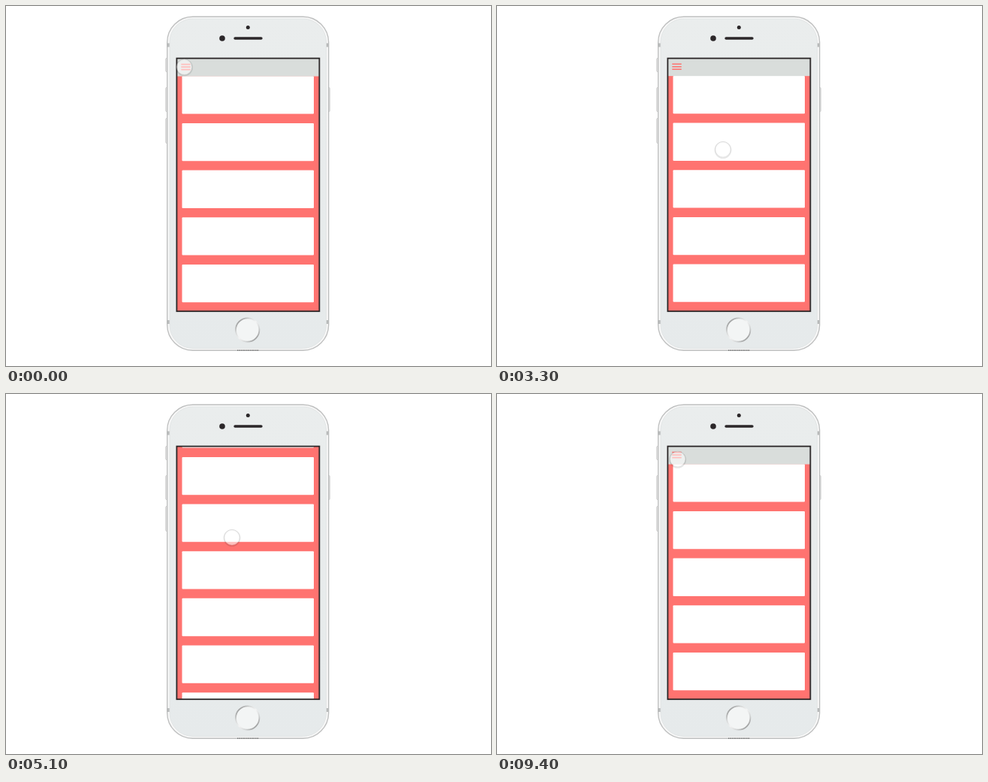
These frames come from a looping animation (646x479 px, 9.5 s). An HTML page:

```html
<!DOCTYPE html>
<html lang="en">
<head>
<meta charset="utf-8">
<title>Phone drawer and scroll</title>
<style>
html, body { margin: 0; width: 100%; height: 100%; overflow: hidden; background: #fff; }
svg { display: block; width: 646px; height: 479px; }
</style>
</head>
<body>
<svg viewBox="0 0 646 479">
  <defs>
    <linearGradient id="face" x1="0" y1="0" x2="0" y2="1">
      <stop offset="0" stop-color="#eaeded"/>
      <stop offset="1" stop-color="#e6eaeb"/>
    </linearGradient>
    <linearGradient id="cream" x1="0" y1="0" x2="0" y2="1">
      <stop offset=".25" stop-color="#f6f6e7"/>
      <stop offset=".4" stop-color="#f5f8e6"/>
    </linearGradient>
    <linearGradient id="ring" x1="0" y1="0" x2="1" y2="1">
      <stop offset="0" stop-color="#777"/>
      <stop offset=".3" stop-color="#d4d6d6"/>
      <stop offset=".5" stop-color="#f4f4f4"/>
      <stop offset=".7" stop-color="#d4d6d6"/>
      <stop offset="1" stop-color="#777"/>
    </linearGradient>
    <clipPath id="screen"><rect x="228" y="70" width="189" height="336"/></clipPath>
  </defs>

  <g fill="#e6e6e6" stroke="#bdbdbd" stroke-width=".7">
    <rect x="212.7" y="69.5" width="3" height="18" rx="1"/>
    <rect x="212.7" y="108.5" width="3" height="32" rx="1"/>
    <rect x="212.7" y="149.5" width="3" height="33" rx="1"/>
    <rect x="428.3" y="108.5" width="3" height="32" rx="1"/>
  </g>
  <rect x="214.7" y="14.2" width="215" height="444" rx="34" fill="#f7f7f7" stroke="#bfc0c0" stroke-width="1.4"/>
  <path d="M214 52h4M426 52h4M214 420.5h4M426 420.5h4" stroke="#b9bbbb" stroke-width="5"/>
  <rect x="218" y="17" width="208.5" height="438.5" rx="31" fill="url(#face)" stroke="#dfe2e2" stroke-width=".8"/>
  <path d="M308 458.2h29" stroke="#777" stroke-width="1.6" stroke-dasharray="1.4 1"/>

  <g fill="#2b2729">
    <circle cx="322.3" cy="28.5" r="2.5"/>
    <circle cx="288" cy="43" r="3.8"/>
    <rect x="303.3" y="41.2" width="38.4" height="3.6" rx="1.8"/>
  </g>
  <circle cx="321.7" cy="431" r="15.7" fill="#f3f5f5" stroke="url(#ring)" stroke-width="1.8"/>

  <g clip-path="url(#screen)">
    <rect x="228" y="70" width="189" height="336" fill="url(#cream)"/>
    <g id="page">
      <rect x="228" y="70" width="189" height="336" fill="#ff7370"/>
      <g id="content">
        <g id="cards" fill="#fff"></g>
        <rect x="228" y="66" width="189" height="27.5" fill="#d9dddb"/>
        <path d="M233.3 77.6h12.4M233.3 81.1h12.4M233.3 84.6h12.4" stroke="#ff7370" stroke-width="1.7"/>
      </g>
    </g>
  </g>
  <rect x="227.4" y="69.6" width="190" height="336.6" fill="none" stroke="#292526" stroke-width="1.8"/>

  <g id="pointer">
    <circle cy=".9" r="10.6" fill="none" stroke="#000" stroke-opacity=".1" stroke-width="1.6"/>
    <circle r="10.3" fill="#fff" fill-opacity=".55" stroke="#999" stroke-opacity=".28" stroke-width=".7"/>
  </g>
</svg>
<script>
const LOOP = 9500, STEP = 100;
const $ = id => document.getElementById(id);

for (let i = 0; i < 9; i++) {
  const card = document.createElementNS("http://www.w3.org/2000/svg", "rect");
  const box = { x: 234.5, y: 93.3 + i * 62.65, width: 175.5, height: 50.3, rx: 1 };
  for (const key in box) card.setAttribute(key, box[key]);
  $("cards").append(card);
}

// Each row: start ms, end ms, from, to
const drawer = [[100, 700, 0, 163], [1600, 2200, 163, 0]];
const scroll = [[3255, 4655, 0, -134.7], [6188, 7588, -134.7, 0]];
const pointer = [[700, 1450, 0, 1], [8800, 9500, 1, 0]];

const ease = u => (1 - Math.cos(Math.PI * u)) / 2;

function valueAt(track, t) {
  let value = track[0][2];
  for (const [start, end, from, to] of track) {
    if (t < start) break;
    value = from + (to - from) * ease(Math.min(1, (t - start) / (end - start)));
  }
  return value;
}

const move = (id, x, y) => $(id).setAttribute("transform", `translate(${x} ${y})`);

function draw() {
  const t = Math.floor(performance.now() % LOOP / STEP) * STEP;
  const p = valueAt(pointer, t);
  move("page", valueAt(drawer, t), 0);
  move("content", 0, valueAt(scroll, t));
  move("pointer", 237.5 + 63.5 * p, 81 + 109.7 * p);
  requestAnimationFrame(draw);
}
draw();
</script>
</body>
</html>
```
